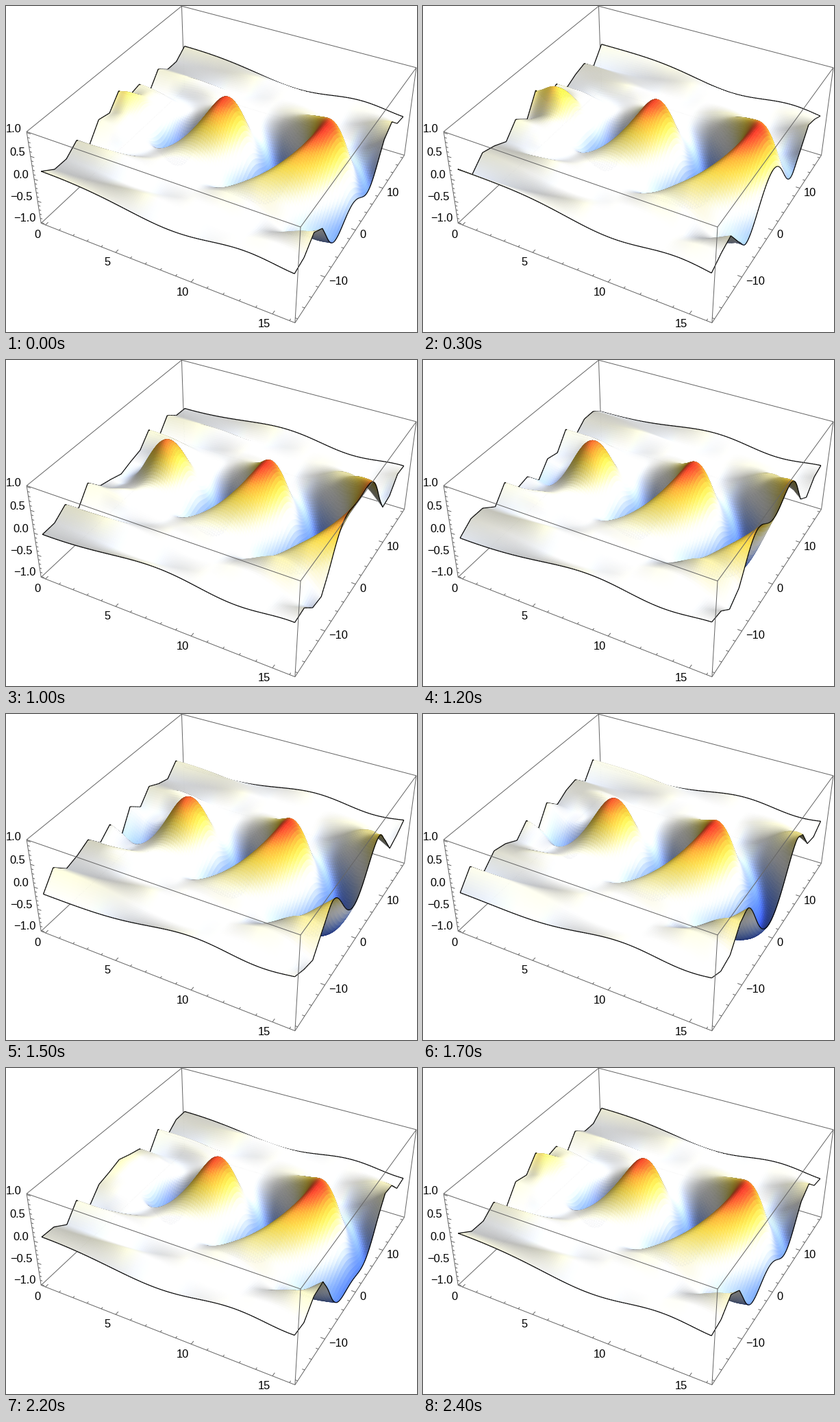
Write a matplotlib script that moves like this. It is 600x475 px and loops after 2500 ms.

```python
import numpy as np
import matplotlib.pyplot as plt
from matplotlib.animation import FuncAnimation
from matplotlib.collections import LineCollection, PolyCollection

W, H, DPI = 600, 475, 100
STEPS = 24                      # one wave period
X_MAX, Y_MAX, PAD, Z_PAD = 16, 18, 1.04, 1.02
SLIT = 4                        # half width of the aperture
NX, NY, COARSE = 126, 140, 10
PX = 72 / DPI

plt.rcParams["font.family"] = "Liberation Sans"

# Camera
CAM = np.array([1.3, -2.4, 2.0])
DIST = np.linalg.norm(CAM)
FWD = -CAM / DIST
RIGHT = np.cross(FWD, [0, 0, 1])
RIGHT /= np.linalg.norm(RIGHT)
UP = np.cross(RIGHT, FWD)
SCALE, CX, CY = 1367, 328.7, 201.7

# Three white lights, given as right, up, towards the viewer
AMBIENT, POWER = 0.35, 0.37
LIGHTS = [np.array(v) / np.linalg.norm(v) @ np.array([RIGHT, UP, -FWD])
          for v in ([1, 0, 1], [1, 1, 1], [0, 1, 1])]

STOPS = [0, .11, .22, .33, .43, .5, .58, .67, .78, .87, .93, 1]
RAMP = np.array([
    (.18, .305, .934), (.31, .46, .94), (.50, .63, .95), (.73, .80, .965),
    (.91, .93, .965), (.96, .96, .95), (.95, .945, .83), (.94, .90, .58),
    (.93, .82, .28), (.93, .64, .20), (.92, .40, .17), (.88, .14, .13)])


def project(p):
    p = np.asarray(p, float)
    k = SCALE / (DIST + p @ FWD)
    return np.stack([CX + k * (p @ RIGHT), CY - k * (p @ UP)], -1)


def to_box(x, y, z):
    return np.stack(np.broadcast_arrays(
        (x - X_MAX / 2) / (X_MAX * PAD), y / (2 * Y_MAX * PAD), 0.2 * z / Z_PAD), -1)


def wave_field():
    """Mean of unit waves from all points of the slit."""
    src = (np.arange(80) + 0.5) / 80 * 2 * SLIT - SLIT
    r = np.hypot(xs[None, :, None], ys[:, None, None] - src)
    return np.exp(1j * r).mean(-1)


def coarsen(a):
    """Coarse sampling in y near the aperture and far from the axis."""
    rough = np.tensordot(hat, a[::COARSE], 1)
    w = fine.reshape(fine.shape + (1,) * (a.ndim - 2))
    return w * a + (1 - w) * rough


def cells(a):
    return (a[:-1, :-1] + a[1:, :-1] + a[:-1, 1:] + a[1:, 1:]) / 4


xs = np.linspace(0, X_MAX, NX + 1)
ys = np.linspace(-Y_MAX, Y_MAX, NY + 1)
gx, gy = np.meshgrid(xs, ys)
nodes = ys[::COARSE]
hat = np.stack([np.interp(ys, nodes, row) for row in np.eye(len(nodes))], 1)
fine = (np.clip(gx * 14 / X_MAX - 1, 0, 1)
        * np.clip(4 - np.abs(gy) * 7 / Y_MAX, 0, 1))
smooth = wave_field()
shape = coarsen(smooth)


def segments(a):
    return np.concatenate([np.stack([b[:-1], b[1:], b[1:], b[:-1]], 1)
                           for b in (a[0], a[-1], a[:, 0], a[:, -1])])


# Far to near drawing order; border lines come just after their cells
ground = to_box(gx, gy, 0 * gx)
depth = ground @ FWD
line_depth = segments(depth).mean(1) - 0.008
order = np.argsort(-np.concatenate([cells(depth).ravel(), line_depth]))
n_lines = len(line_depth)
widths = np.r_[np.full(NX * NY, 0.4), np.full(n_lines, 1.25 * PX)][order]
line_rgb = np.zeros((n_lines, 3))


def normals(z):
    dy, dx = np.gradient(0.2 * z / Z_PAD, ground[:, 0, 1], ground[0, :, 0])
    n = np.stack([-dx, -dy, np.ones_like(z)], -1)
    return n / np.linalg.norm(n, axis=-1, keepdims=True)


def shade(z, z_drawn, pos):
    n = normals(z)
    t = (z / Z_PAD + 1) / 2
    base = np.stack([np.interp(t, STOPS, c) for c in RAMP.T], -1)

    def lit(side):
        light = AMBIENT + POWER * sum(np.clip(side * (n @ d), 0, None) for d in LIGHTS)
        return coarsen(np.clip(base * light[..., None], 0, 1))

    back = ((CAM - pos) * normals(z_drawn)).sum(-1) < 0
    rgb = np.where(back[..., None], lit(-1), lit(1))
    return np.clip(cells(rgb).reshape(-1, 3), 0, 1)


fig = plt.figure(figsize=(W / DPI, H / DPI), dpi=DPI, facecolor="white")
ax = fig.add_axes([0, 0, 1, 1])
ax.set(xlim=(0, W), ylim=(H, 0))
ax.axis("off")


def lines(pairs, z):
    ax.add_collection(LineCollection([project(p) for p in pairs], colors="0.4",
                                     linewidths=PX, zorder=z), autolim=False)


def corner(i, j, k):
    return np.array([i - 0.5, j - 0.5, 0.4 * k - 0.2])


def draw_box():
    ends = [(i, j, k) for i in (0, 1) for j in (0, 1) for k in (0, 1)]
    behind, front = [], []
    for a in ends:
        for b in ends:
            if a < b and sum(p != q for p, q in zip(a, b)) == 1:
                hidden = a[0] == b[0] == 0 or a[1] == b[1] == 1
                outline = a[2] != b[2] and a[0] == a[1]
                (behind if hidden and not outline else front).append(
                    (corner(*a), corner(*b)))
    lines(behind, 1)
    lines(front, 5)


def draw_axis(values, major, place, inward, label, shift, ha):
    ticks = []
    for v in values:
        p = place(v)
        big = abs(v / major - round(v / major)) < 1e-6
        ticks.append((p, p + np.array(inward) * (0.016 if big else 0.009)))
        if big:
            x, y = project(p) + shift
            ax.text(x, y, label(v).replace("-", "\u2212"), ha=ha, va="center_baseline",
                    fontsize=16.5 * PX, color="black", zorder=6)
    lines(ticks, 5)


def integer(v):
    return f"{v:.0f}"


def decimal(v):
    return f"{v:.1f}"


draw_box()
draw_axis(np.arange(0, 17), 5,
          lambda v: np.array([(v - X_MAX / 2) / (X_MAX * PAD), -0.5, -0.2]),
          (0, 1, 0), integer, (-12, 13.3), "center")
draw_axis(np.arange(-18, 19, 2), 10,
          lambda v: np.array([0.5, v / (2 * Y_MAX * PAD), -0.2]),
          (-1, 0, 0), integer, (6, 5.3), "left")
draw_axis(np.arange(-10, 11) / 10, 0.5,
          lambda v: np.array([-0.5, -0.5, 0.2 * v / Z_PAD]),
          (1, 0, 0), decimal, (-8, -7), "right")

surface = PolyCollection(np.zeros((len(order), 4, 2)), linewidths=widths,
                         joinstyle="round", zorder=3)
ax.add_collection(surface, autolim=False)


def update(n):
    turn = np.exp(-2j * np.pi * n / STEPS)
    z, z_drawn = (smooth * turn).imag, (shape * turn).imag
    pos = to_box(gx, gy, z_drawn)
    pts = project(pos)
    quads = np.stack([pts[:-1, :-1], pts[:-1, 1:], pts[1:, 1:], pts[1:, :-1]], 2)
    verts = np.concatenate([quads.reshape(-1, 4, 2), segments(pts)])[order]
    rgb = np.concatenate([shade(z, z_drawn, pos), line_rgb])[order]
    surface.set_verts(verts)
    surface.set_facecolor(rgb)
    surface.set_edgecolor(rgb)
    return [surface]


anim = FuncAnimation(fig, update, frames=STEPS + 1, interval=100,
                     repeat=True, repeat_delay=0, blit=False)
plt.show()
```
